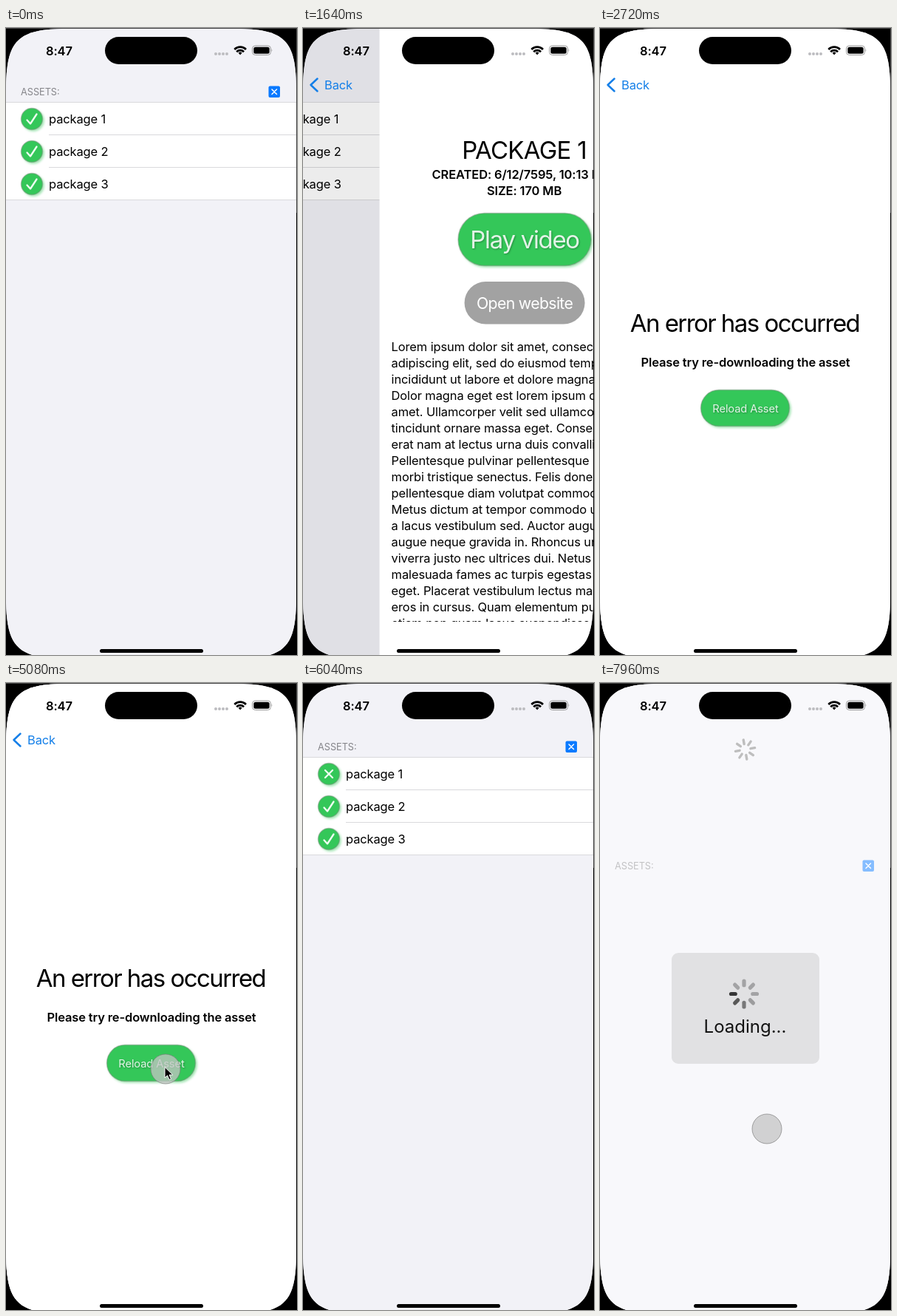
An HTML page for the animation above (8000 ms loop, 394 px wide and 848 px high).

```html
<!DOCTYPE html>
<html lang="en">
<head>
<meta charset="utf-8">
<title>Asset list</title>
<style>
html, body { margin: 0; width: 100%; height: 100%; overflow: hidden; background: #000; }
svg { display: block; }
text { font: 16.5px Inter, "Liberation Sans", sans-serif; font-optical-sizing: none; letter-spacing: -.008em; white-space: pre; }
.mid { text-anchor: middle; }
.bold { font-weight: 600; }
.big { font-size: 33px; letter-spacing: -.047em; }
.line { fill: none; stroke-linecap: round; stroke-linejoin: round; }
.raised { fill: #34c759; stroke: #7a8a7a70; stroke-width: 1.5; filter: drop-shadow(2.5px 2.5px 1.5px #34c75970); }
.label { fill: #fffd; filter: drop-shadow(1.5px 1.5px 1px #0005); }
.sep { stroke: #d9d9dc; }
</style>
</head>
<body>
<svg width="394" height="848" viewBox="0 0 394 848">
  <defs>
    <clipPath id="screen"><path d="M0 85C0 16 15 1 84 1H309C378 1 393 16 393 85V769C393 838 378 853 309 853H84C15 853 0 838 0 769Z"/></clipPath>
    <clipPath id="body"><path d="M0 400H394V803H0Z"/></clipPath>
  </defs>
  <path d="M0 .5H393.5V250" fill="none" stroke="#444"/>
  <g clip-path="url(#screen)">
    <rect width="394" height="848" fill="#f2f2f7"/>
    <g id="list">
      <rect width="394" height="848" fill="#f2f2f7"/>
      <g id="refresh" fill="none" stroke="#777" stroke-width="3.4" stroke-linecap="round"></g>
      <g id="content">
        <text x="20" y="90.5" style="font-size:12.7px;letter-spacing:0" fill="#85858a">ASSETS:</text>
        <rect x="355.5" y="78.5" width="15.5" height="15.5" rx="2" fill="#0a7aff"/>
        <path class="line" stroke="#fff" stroke-width="1.5" d="M360 83l6.5 6.5m0-6.5l-6.5 6.5"/>
        <g id="rows"></g>
      </g>
    </g>
    <rect id="dim" width="394" height="848"/>
    <g id="page">
      <rect width="394" height="848" fill="#fff"/>
      <g id="detail">
        <text class="mid big" x="196" y="177" style="letter-spacing:-.022em">PACKAGE 1</text>
        <text class="bold" x="71" y="204">CREATED: 6/12/7595, 10:13 PM</text>
        <text class="mid bold" x="196" y="226">SIZE: 170 MB</text>
        <rect class="raised" x="106.5" y="250.5" width="180" height="71" rx="35.5"/>
        <text class="mid big label" x="196.5" y="298" style="letter-spacing:-.04em">Play video</text>
        <rect x="115" y="343" width="163" height="57.5" rx="28.7" fill="#a2a2a2"/>
        <text class="mid" x="196.5" y="379.5" fill="#fff" style="font-size:21.3px;letter-spacing:-.032em">Open website</text>
        <g id="lorem" clip-path="url(#body)"></g>
      </g>
      <g id="error">
        <text class="mid big" x="196" y="411">An error has occurred</text>
        <text class="mid bold" x="197" y="458">Please try re-downloading the asset</text>
        <rect class="raised" x="136.500" y="489.500" width="120" height="49" rx="24.5"/>
        <text class="mid label" x="197" y="519.5" style="font-size:14.7px">Reload Asset</text>
      </g>
    </g>
    <g id="back">
      <path class="line" stroke="#147fe8" stroke-width="2.5" d="M19.5 68.5L10.5 77l9 8.5"/>
      <text x="29" y="83" fill="#147fe8">Back</text>
    </g>
    <g id="loading">
      <rect width="394" height="848" fill="#fff" opacity=".5"/>
      <rect x="97" y="365" width="200" height="150" rx="9" fill="#e1e1e3"/>
      <g id="wheel" fill="none" stroke="#222" stroke-width="5.2" stroke-linecap="round"></g>
      <text class="mid" x="196.5" y="472.5" fill="#111" style="font-size:24px;letter-spacing:0">Loading...</text>
    </g>
    <text class="bold" x="54" y="36.5">8:47</text>
    <rect x="134" y="12" width="125" height="37" rx="18.5"/>
    <path class="line" stroke="#bcbcc0" stroke-width="4" d="M284 35h0M289 35h0M294 35h0M299 35h0"/>
    <g class="line" stroke="#000" stroke-width="2.7" style="stroke-linecap:butt">
      <path d="M309.3 29a11 11 0 0 1 15.7 0M312.2 32.2a7 7 0 0 1 9.9 0"/>
      <path d="M314.6 33.6a3.6 3.6 0 0 1 5 0L317.1 36.5Z" fill="#000" stroke="none"/>
    </g>
    <rect x="333.5" y="24" width="25" height="12.5" rx="4" fill="none" stroke="#999"/>
    <rect x="335.3" y="25.8" width="21.4" height="9" rx="2.5"/>
    <path d="M359.7 28.3q1.7 2 0 4z" fill="#999"/>
    <rect x="127" y="840" width="140" height="5" rx="2.5"/>
  </g>
  <circle id="touch" r="20" fill="#c4c4c4" fill-opacity=".75" stroke="#777" stroke-opacity=".8" stroke-width=".8"/>
  <path id="pointer" d="M0 0V14.5L3.5 11.3 6 17 8.5 16 6 10.5H10.8Z" stroke="#fff" stroke-width="1"/>
</svg>
<script>
const $ = id => document.getElementById(id);
const show = (id, on) => $(id).style.display = on ? '' : 'none';
const move = (id, x, y = 0) => $(id).setAttribute('transform', `translate(${x} ${y})`);
const clamp = v => Math.min(1, Math.max(0, v));

const CHECK = 'M28.5 124.5L33 129.5 41.5 116.5', CROSS = 'M30 118l10 10m0-10l-10 10';
$('rows').innerHTML = '<rect y="100.5" width="394" height="132" fill="#fff"/>' +
  [0, 1, 2].map(i => `<g transform="translate(0 ${i * 44})">
    <circle class="raised" cx="35" cy="123" r="14.5"/>
    <path class="line mark" stroke="#effff2" stroke-width="2.3" d="${CHECK}"/>
    <text x="58" y="129">package ${i + 1}</text></g>`).join('') +
  '<path class="sep" d="M0 100.5H394M58 144.5H394M58 188.5H394M0 232.5H394"/>';
const firstMark = document.querySelector('.mark');

$('lorem').innerHTML = `Lorem ipsum dolor sit amet, consectetur
adipiscing elit, sed do eiusmod tempor
incididunt ut labore et dolore magna aliqua.
Dolor magna eget est lorem ipsum dolor sit
amet. Ullamcorper velit sed ullamcorper morbi
tincidunt ornare massa eget. Consectetur
erat nam at lectus urna duis convallis convallis.
Pellentesque pulvinar pellentesque habitant
morbi tristique senectus. Felis donec et odio
pellentesque diam volutpat commodo sed.
Metus dictum at tempor commodo ullamcorper
a lacus vestibulum sed. Auctor augue mauris
augue neque gravida in. Rhoncus urna neque
viverra justo nec ultrices dui. Netus et
malesuada fames ac turpis egestas sed
eget. Placerat vestibulum lectus mauris ultrices
eros in cursus. Quam elementum pulvinar
etiam non quam lacus suspendisse faucibus`
  .split('\n').map((s, i) => `<text x="16" y="${437 + 22 * i}">${s}</text>`).join('');

// Eight spokes, clockwise from the top
const spokes = (x, y, from, to, alpha) => [...Array(8).keys()].map(i =>
  `<path transform="translate(${x} ${y}) rotate(${i * 45})" d="M0 ${-from}V${-to}" opacity="${alpha(i)}"/>`).join('');
$('refresh').innerHTML = spokes(0, 0, 7.5, 13.3, () => 1);
$('wheel').innerHTML = spokes(195, 420.5, 11.8, 17.5, i => [.32, .32, .32, .36, .55, .72, .9, .32][i]);
const petals = [...$('refresh').children];

// Critically damped spring, 0 to 1
const spring = ms => ms <= 0 ? 0 : 1 - (1 + ms * .02) * Math.exp(-ms * .02);

function draw(t) {
  const during = (a, b) => t >= a && t < b;

  // Push and pop of the detail page
  const p = t < 1600 ? 0 : t < 5240 ? spring(t - 1510) : 1 - spring(t - 5215);
  const failed = t >= 1840;
  move('list', -118 * p);
  $('dim').setAttribute('opacity', .1 * p);
  move('page', 393 * (1 - p));
  $('back').setAttribute('opacity', clamp(p * 1.4));
  show('detail', !failed);
  show('error', failed);
  firstMark.setAttribute('d', failed ? CROSS : CHECK);

  // Pull to refresh
  const drag = clamp((t - 7480) / 480) ** 2.2;
  const pull = 161 * drag ** .8;
  const loading = t >= 7940;
  move('content', 0, pull);
  $('refresh').setAttribute('transform', `translate(196.5 90) rotate(${loading ? -10 : 0})`);
  petals.forEach((el, i) => el.setAttribute('opacity',
    loading ? .95 : .55 * clamp((pull - 33 - i * 10) / 10)));
  show('rows', !loading);
  show('loading', loading);

  // Touch and pointer
  show('touch', during(1400, 1600) || during(5080, 5240) || t >= 7440);
  if (t < 2000) move('touch', 189, 122);
  else if (t < 6000) move('touch', 216, 522);
  else move('touch', 240 - 14 * drag, 113 + 490 * drag);
  show('pointer', during(1440, 1600) || during(2000, 2720) || during(4240, 6040));
  if (t < 3000) move('pointer', 188, 119);
  else move('pointer', 215, 519.5);
}

function tick() {
  draw(performance.now() % 8000);
  requestAnimationFrame(tick);
}
tick();
</script>
</body>
</html>
```
